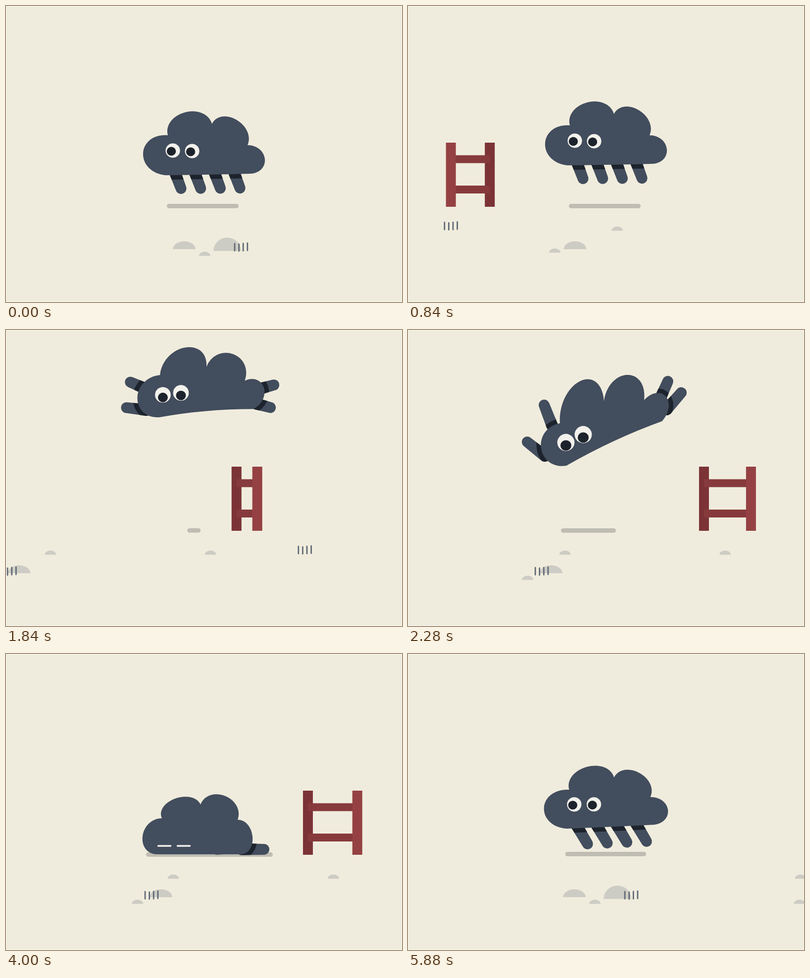
Write an HTML page with a canvas that moves like this. It is 800 px wide and 600 px high and loops after 5.92 s.

```html
<!DOCTYPE html>
<html lang="en">
<head>
<meta charset="utf-8">
<title>Jumping cloud</title>
<style>
html, body { margin: 0; width: 100%; height: 100%; overflow: hidden; background: #f0ecdd; }
canvas { display: block; width: 800px; height: 600px; }
</style>
</head>
<body>
<canvas width="800" height="600"></canvas>
<script>
const g = document.querySelector('canvas').getContext('2d');
const LOOP = 5920, STEP = 40, CELL = 80, STOP = 2320, START = 5000;
const BLUE = '#424d5d', DARK = '#1d232c', WHITE = '#f2f1ec', PAPER = '#f0ecdd';

// Two legs reaching from a shared hip towards their feet: root x, y, foot x, y each
const fan = (hx, hy, ...feet) => feet.flatMap(([x, y]) => {
  const reach = 45 / Math.hypot(hx - x, hy - y);
  return [x + (hx - x) * reach, y + (hy - y) * reach, x, y];
});

// body: low front corner, then peak and valley in turn, low rear corner, belly
// look: pupil offset and eye radius; shade: centre, half width, y
const stand = {
  body: [322,343, 277,298, 327,262, 362,215.5, 416,239, 466,231, 488,282, 523,311, 492,340, 410,342],
  eyes: [337,293, 376,294], look: [-3,1.5,14.6], shade: [397.5,72.5,405.5]
};
const leap = {
  body: [305,162, 263,121, 314,77, 372,41, 411,80, 469,72, 486,128, 521,157, 490,195, 395,171],
  eyes: [315.5,118, 353,122], look: [0,4.7,14.8], shade: [390,-15,406],
  legs: [...fan(491, 100, [235,126], [245,162]), ...fan(452, 139, [522,229], [552,168])]
};
const dive = {
  body: [320,275, 269,240, 307,189, 347,104, 396,144, 443,91, 477,142, 521,135, 513,185, 416,220],
  eyes: [319,228, 354,212], look: [0,6,17.4], shade: [364.5,55.5,406.5],
  legs: [...fan(332, 300, [275,152], [241,227]), ...fan(475, 216, [552,127], [525,104])]
};
const lie = spread => ({
  body: [305,406, 276,369, 315,333, 342,293, 393,305, 443,288, 468,336, 498,370, 475,406, 390,406],
  eyes: [320,388, 359,388], look: [-2,1,14.5], shade: [411,128,406.5],
  legs: [...fan(390, 394, [310 - 90 * spread, 394], [330 - 90 * spread, 394]),
    ...fan(400, 395, [470 + 40 * spread, 394], [521 + 12 * spread, 396])]
});
const rest = lie(0);

const mapPose = (p, f) => Object.fromEntries(Object.keys(p).map(k => [k, p[k].map((v, i) => f(v, i, k))]));
const mix = (a, b, k) => mapPose(a, (v, i, key) => v + (b[key][i] - v) * k);
// Moves every point of the figure; its look and shade stay
const warp = (p, f) => mapPose(p, (v, i, key) => {
  if (key === 'look' || key === 'shade') return v;
  const at = i - i % 2;
  return f(p[key][at], p[key][at + 1])[i % 2];
});
const lift = (p, dy) => warp(p, (x, y) => [x, y + dy]);
const squash = (p, w) => {
  const q = warp(p, (x, y) => [387 + (x - 387) * (1 + w), 406 + (y - 406) * (1 - w)]);
  q.shade[1] *= 1 + w;
  return q;
};

// Five-cell bounding run: the body sinks and tilts while the legs swing together
function run(cell) {
  const turn = cell / 5 * 2 * Math.PI;
  const k = .9 * (Math.cos(.44) - Math.cos(turn - .44));
  const swing = Math.tan((4 + 28 * Math.cos(turn + .94)) * Math.PI / 180);
  const p = warp(stand, (x, y) => [400 + (x - 400) * (1 + .02 * k),
    y + k * (11 + .03 * (290 - y) - .03 * (x - 400))]);
  p.legs = [0, 1, 2, 3].flatMap(i => {
    const x = 343.5 + 39.7 * i, tilt = (.3 + 1.5 * k) * i;
    const belly = 343 + 10 * k, foot = 370 + 16 * Math.min(k, 1);
    return [x - swing * 14, belly - 14 - tilt, x + swing * (foot - belly), foot - tilt];
  });
  p.shade = [397.5 + 2 * k, 72.5 + 10 * k, 405.5];
  return p;
}
const high = run(0);

function poseAt(c) {
  if (c < 10) return run(c);
  if (c < 17) return lift(mix(high, leap, ((c - 10) / 7) ** .75), c === 10 ? -20 : 0);
  if (c < 29) {
    const k = ((c - 17) / 11) ** 1.5;
    return lift(mix(leap, dive, k), -128 * k * (1 - k));
  }
  if (c < 31) return lift(dive, c === 29 ? 70 : 115);
  if (c < 37) {
    const n = c - 31, fade = Math.exp(-.6 * n);
    return squash(lie(fade), .3 * fade * Math.cos(1.5 * n));
  }
  if (c < 58) return rest;
  if (c < 60) return squash(rest, .07 * (c - 57));
  if (c < 62) return mix(rest, high, c === 60 ? .5 : .9);
  return run(c + 1);
}

const shut = cell => [40, 42, 50].includes(cell);
const openness = cell => shut(cell) ? 0 : shut(cell - 1) ? .5 : 1;

function line(x0, y0, x1, y1, width, color) {
  g.lineWidth = width; g.strokeStyle = color; g.lineCap = 'round';
  g.beginPath(); g.moveTo(x0, y0); g.lineTo(x1, y1); g.stroke();
}
function oval(x, y, rx, ry, color) {
  g.fillStyle = color;
  g.beginPath(); g.ellipse(x, y, rx, ry, 0, 0, 7); g.fill();
}
function box(x, y, w, h, color) {
  g.fillStyle = color; g.fillRect(x, y, w, h);
}

// Skewed half ellipse from (ax, ay) over its peak (px, py) to (bx, by)
function lobe(path, ax, ay, px, py, bx, by) {
  const k = .57, ux = (px - (ax + bx) / 2) * k, uy = (py - (ay + by) / 2) * k;
  const vx = (bx - ax) / 2 * k, vy = (by - ay) / 2 * k;
  path.bezierCurveTo(ax + ux, ay + uy, px - vx, py - vy, px, py);
  path.bezierCurveTo(px + vx, py + vy, bx + ux, by + uy, bx, by);
}
function bodyPath(b) {
  const path = new Path2D();
  path.moveTo(b[0], b[1]);
  for (let i = 0; i < 16; i += 4) lobe(path, ...b.slice(i, i + 6));
  path.quadraticCurveTo(b[18], b[19], b[0], b[1]);
  path.closePath();
  return path;
}
function legPath(legs) {
  const path = new Path2D(), r = 11, q = Math.PI / 2;
  for (let i = 0; i < legs.length; i += 4) {
    const [x0, y0, x1, y1] = legs.slice(i, i + 4), a = Math.atan2(y1 - y0, x1 - x0);
    path.moveTo(x1 + r * Math.sin(a), y1 - r * Math.cos(a));
    path.arc(x1, y1, r, a - q, a + q);
    path.arc(x0, y0, r + .8, a + q, a + 3 * q);
    path.closePath();
  }
  return path;
}

function drawCloud(p, open) {
  const [sx, half, sy] = p.shade;
  if (half > 5) line(sx - half + 4.5, sy, sx + half - 4.5, sy, 9, '#bfbdb3');

  // The body's dark rim falls on the legs only
  const body = bodyPath(p.body), legs = legPath(p.legs);
  g.fillStyle = BLUE;
  g.fill(legs);
  g.save();
  g.clip(legs);
  g.lineWidth = 18; g.strokeStyle = DARK; g.lineJoin = 'round';
  g.stroke(body);
  g.restore();
  g.fill(body);

  const [dx, dy, r] = p.look;
  for (let i = 0; i < 4; i += 2) {
    const x = p.eyes[i], y = p.eyes[i + 1];
    if (!open) { line(x - 12.5, y + 1, x + 12.5, y + 1, 3.5, WHITE); continue; }
    g.save();
    oval(x, y, r, r * open, WHITE);
    g.clip();
    oval(x + dx, y + dy, r * .63, r * .61, DARK);
    g.restore();
  }
}

function rock(x, base, w, h) {
  g.fillStyle = '#cdccc4';
  g.beginPath(); g.ellipse(x + w / 2, base, w / 2, h, 0, Math.PI, 0); g.fill();
}
const pebble = (x, base) => rock(x, base, 23, 8.5);
const stone = x => rock(x, 493, 46, 16);
function grass(x, base) {
  for (let i = 0; i < 4; i++) {
    const sway = Math.sin(i * 1.6);
    line(x + 1 + i * 8.6, base - 15.5 + sway, x + 1 + i * 8.6, base - .8 + sway * .6, 2.7, '#5e6874');
  }
}

function drawGround(d) {
  const near = x => {
    const at = x + d * .597;
    return at > 900 ? at - (LOOP - START + STOP) * .597 : at;
  };
  const far = x => x + d * .517;
  for (const x of [-23, -549.5, -873]) pebble(far(x), 455.5);
  for (const x of [337, -187, -1095]) stone(near(x));
  for (const x of [390, -1131]) pebble(near(x), 506.5);
  pebble(near(-216.5), 500);
  rock(near(419), 496.5, 56, 27);
  grass(far(-361.5), 454);
  for (const x of [461, -1105]) grass(near(x), 497);

  const front = -277 + d * .421, back = -97.2 + d * .3005;
  box(back, 277, 20, 130, '#7b3336');
  for (const y of [302.5, 364]) box(front + 10, y, back - front, 16, '#873a3c');
  box(front, 277, 20, 130, '#954144');
}

function frame(now) {
  const t = Math.floor(now % LOOP / STEP) * STEP, cell = Math.floor(t / CELL);
  const travelled = t < START ? Math.min(t, STOP) : STOP + t - START;
  box(0, 0, 800, 600, PAPER);
  g.lineWidth = 1; g.strokeStyle = '#f9f7f0'; g.strokeRect(.5, .5, 799, 599);
  drawGround(travelled);
  drawCloud(poseAt(cell), openness(cell));
}

let began;
function tick(now) {
  began ??= now;
  frame(now - began);
  requestAnimationFrame(tick);
}
frame(0);
requestAnimationFrame(tick);
</script>
</body>
</html>
```
